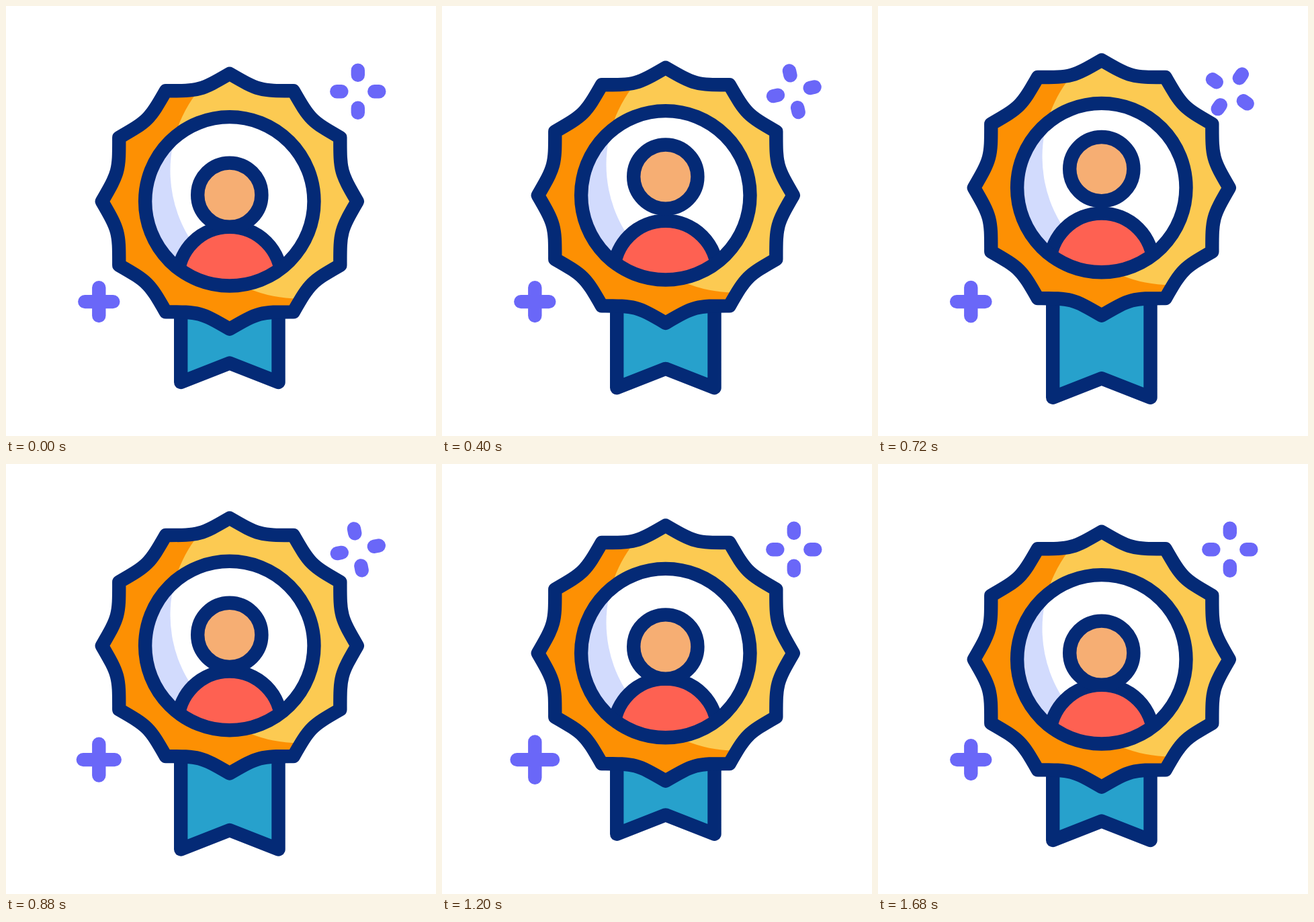
Write an HTML page that moves like this. It is 640 px wide and 640 px high and loops after 1.76 s.

```html
<!DOCTYPE html>
<html lang="en">
<head>
<meta charset="utf-8">
<title>Award badge</title>
<style>
  html, body { margin: 0; width: 100%; height: 100%; overflow: hidden; background: #fff; }
  svg { display: block; width: 100vw; height: 100vh; }
  .line { stroke: #042a76; stroke-width: 20.4; stroke-linejoin: round; }
  .accent { fill: none; stroke: #6a67f8; stroke-width: 20.4; stroke-linecap: round; }
</style>
</head>
<body>
<svg viewBox="0 0 640 640">
  <defs>
    <clipPath id="starClip"><path class="star"/></clipPath>
    <clipPath id="discClip"><circle cx="332.8" cy="290.8" r="125"/></clipPath>
  </defs>

  <path id="ribbon" class="line" fill="#27a1cc"/>

  <g id="badge">
    <path class="star" fill="#fd9003"/>
    <circle cx="435" cy="245" r="190.5" fill="#fcca52" clip-path="url(#starClip)"/>
    <path class="star line" fill="none"/>
    <g clip-path="url(#discClip)">
      <circle cx="332.8" cy="290.8" r="125" fill="#d2dbfd"/>
      <circle cx="435" cy="245" r="190.5" fill="#fff"/>
      <circle class="line" cx="332.8" cy="405.8" r="77" fill="#fe6152"/>
    </g>
    <circle class="line" cx="332.8" cy="290.8" r="125.7" fill="none"/>
    <circle id="head" class="line" cx="332.8" cy="281.2" r="47.6" fill="#f6ae73"/>
  </g>

  <path id="sparkle" class="accent" d="M0-31.5v7M0 31.5v-7M-31.5 0h7M31.5 0h-7"/>
  <path id="plus" class="accent"/>
</svg>
<script>
const LOOP = 1760, STEP = 40;
const $ = id => document.getElementById(id);

// Twelve tips joined by inward curves with nearly straight ends
const polar = (r, deg) => {
  const a = deg * Math.PI / 180;
  return `${(332.8 + r * Math.sin(a)).toFixed(2)} ${(290.8 - r * Math.cos(a)).toFixed(2)}`;
};
let outline = 'M' + polar(190, 0);
for (let deg = 0; deg < 360; deg += 30) {
  outline += `C${polar(170.5, deg + 14.6)} ${polar(170.5, deg + 15.4)} ${polar(190, deg + 30)}`;
}
document.querySelectorAll('.star').forEach(p => p.setAttribute('d', outline + 'Z'));

// cubic-bezier(.585, 0, .415, 1), solved by bisection
function ease(x) {
  let lo = 0, hi = 1;
  for (let i = 0; i < 24; i++) {
    const s = (lo + hi) / 2;
    if (1.755 * s - 2.265 * s * s + 1.51 * s ** 3 < x) lo = s; else hi = s;
  }
  return lo * lo * (3 - 2 * lo);
}

// Each key is [time in ms, value]
function track(keys, t) {
  if (t <= keys[0][0]) return keys[0][1];
  for (let i = 1; i < keys.length; i++) {
    const [t0, v0] = keys[i - 1], [t1, v1] = keys[i];
    if (t < t1) return v0 + (v1 - v0) * ease((t - t0) / (t1 - t0));
  }
  return keys[keys.length - 1][1];
}

const tracks = {
  badge: [[34, 0], [806, -20.5], [1562, 0]],
  head: [[34, 0], [560, -21], [1110, 0]],
  ribbon: [[168, 0], [694, 22.8], [1153, -9.5], [1460, 0]],
  spin: [[36, 0], [1039, 360]],
  arm: [[645, 21], [1146, 26.8], [1650, 21]]
};

function draw(t) {
  const at = name => track(tracks[name], t);
  const move = (id, value) => $(id).setAttribute('transform', value);
  const drop = at('ribbon'), arm = at('arm');
  move('badge', `translate(0 ${at('badge')})`);
  move('head', `translate(0 ${at('head')})`);
  move('sparkle', `translate(523.8 127.3) rotate(${at('spin')})`);
  $('ribbon').setAttribute('d',
    `M260.2 400V${560 + drop}L332.8 ${531.6 + drop}L405.5 ${560 + drop}V400Z`);
  $('plus').setAttribute('d',
    `M${138.3 - arm} 440.1h${2 * arm}M138.3 ${440.1 - arm}v${2 * arm}`);
}

const start = performance.now();
function tick() {
  const t = (performance.now() - start) % LOOP;
  draw(Math.floor(t / STEP) * STEP);
  requestAnimationFrame(tick);
}
tick();
</script>
</body>
</html>
```
